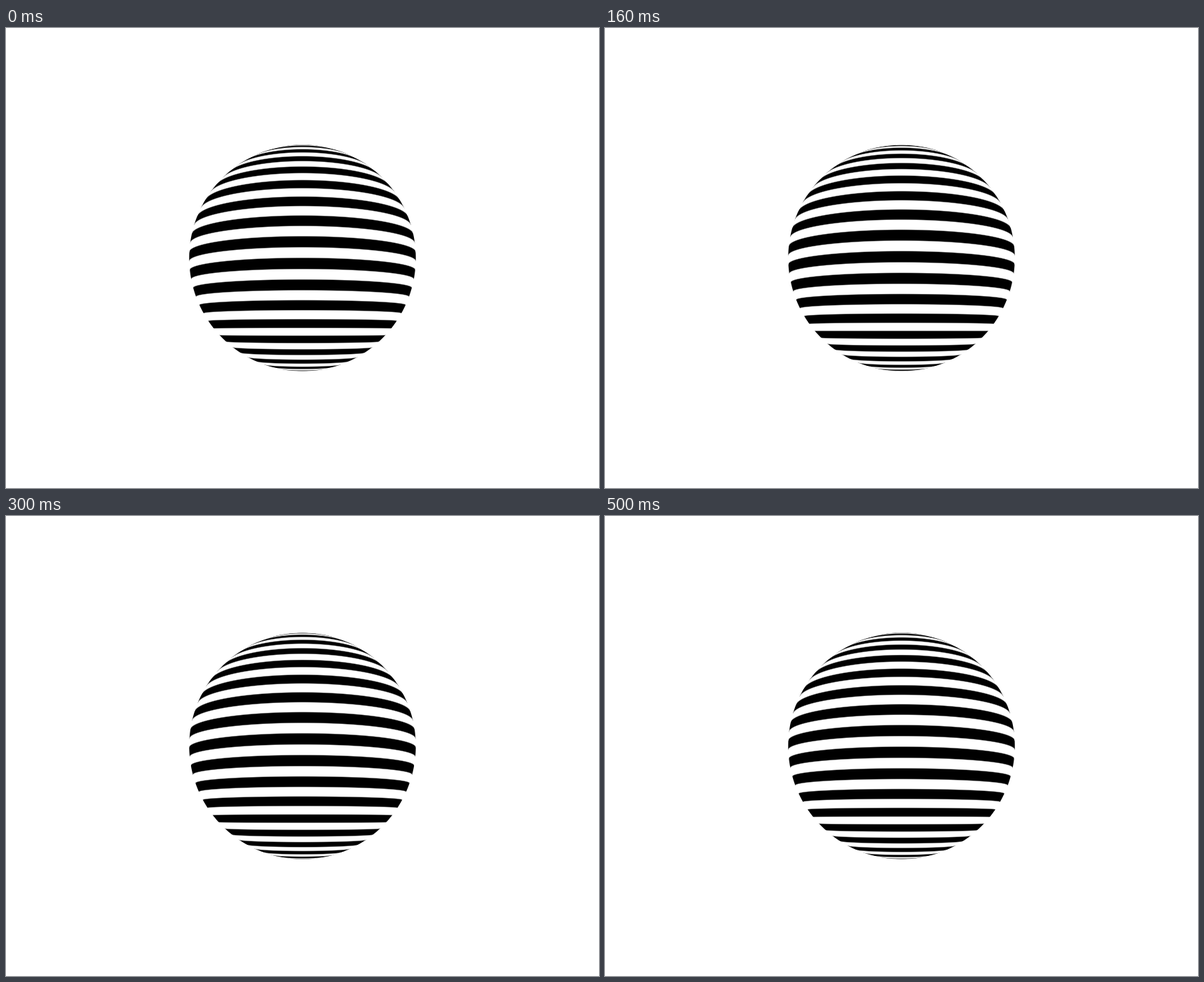
Recreate the animation shown at these times as an HTML page with a canvas. Size 849 by 659 pixels, loop 520 ms.

```html
<!DOCTYPE html>
<html lang="en">
<head>
<meta charset="utf-8">
<title>Striped sphere</title>
<style>
  html, body { margin: 0; width: 100%; height: 100%; overflow: hidden; background: #fff; }
  canvas { position: absolute; left: 262px; top: 167px; }
</style>
</head>
<body>
<canvas id="stage" width="325" height="325"></canvas>
<script>
const SIZE = 325, CENTER = SIZE / 2, RADIUS = 162.2;
const DISTANCE = 5;               // camera distance in sphere radii
const TILT = 7.5;                 // degrees
const PERIOD = 9, HALF_BAND = 2.3; // degrees of latitude
const PHASE = TILT + 2.25;
const LOOP = 520, STEP = 20;

const rad = Math.PI / 180;
const limbTan = 1 / Math.sqrt(DISTANCE ** 2 - 1);
const clamp = v => Math.min(1, Math.max(0, v));

// Latitude in degrees where the ray through a pixel meets the sphere.
function latitude(x, y) {
  const u = x / RADIUS * limbTan, v = y / RADIUS * limbTan;
  const depth = Math.sqrt(Math.max(0, 1 - (x * x + y * y) / RADIUS ** 2));
  const s = (DISTANCE - depth) / (1 + u * u + v * v);
  const up = v * s * Math.cos(TILT * rad) + (DISTANCE - s) * Math.sin(TILT * rad);
  return Math.asin(Math.max(-1, Math.min(1, up))) / rad;
}

const ctx = document.getElementById('stage').getContext('2d');
const image = ctx.createImageData(SIZE, SIZE);
const pixels = [];

for (let row = 0; row < SIZE; row++) {
  for (let col = 0; col < SIZE; col++) {
    const x = col + 0.5 - CENTER, y = row + 0.5 - CENTER;
    const cover = clamp(RADIUS - Math.hypot(x, y) + 0.5);
    if (!cover) continue;
    const dx = latitude(x + 0.5, y) - latitude(x - 0.5, y);
    const dy = latitude(x, y + 0.5) - latitude(x, y - 0.5);
    pixels.push({
      at: (row * SIZE + col) * 4 + 3,
      lat: latitude(x, y),
      blur: 1.4 * Math.hypot(dx, dy) + 0.01,
      cover
    });
  }
}

function draw(progress) {
  const shift = PHASE - PERIOD * progress;
  for (const { at, lat, blur, cover } of pixels) {
    const offset = (lat - shift) / PERIOD;
    const gap = Math.abs(offset - Math.round(offset)) * PERIOD;
    image.data[at] = 255 * cover * clamp(0.5 + (HALF_BAND - gap) / blur);
  }
  ctx.putImageData(image, 0, 0);
}

const start = performance.now();
let shown = -1;
function tick() {
  const step = Math.floor((performance.now() - start) % LOOP / STEP);
  if (step !== shown) draw((shown = step) * STEP / LOOP);
  requestAnimationFrame(tick);
}
tick();
</script>
</body>
</html>
```
